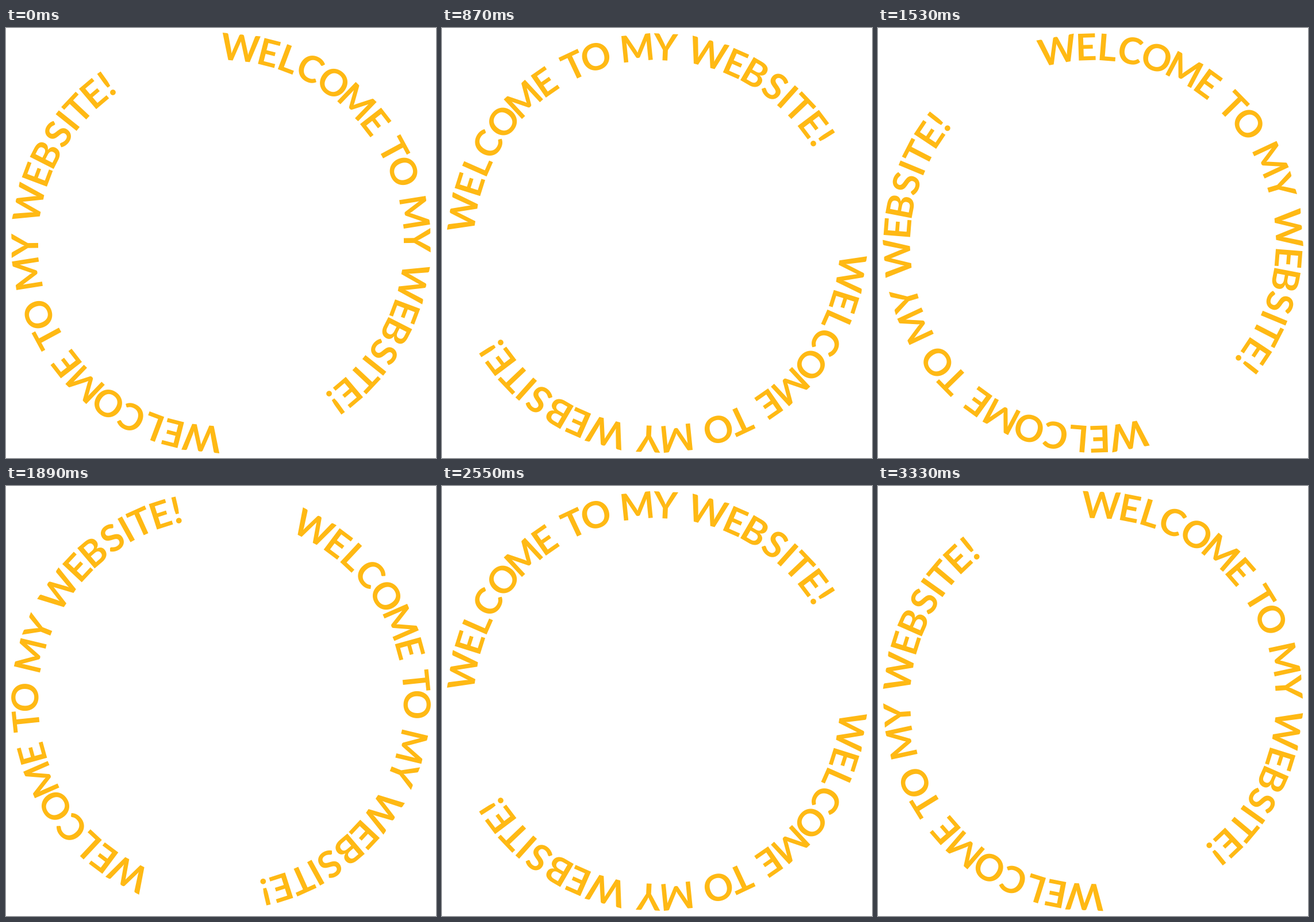
Recreate the animation shown at these times as an HTML page with a canvas. Size 748 by 748 pixels, loop 3.36 s.

```html
<!DOCTYPE html>
<html lang="en">
<head>
<meta charset="utf-8">
<title>Welcome ring</title>
<style>
  html, body { margin: 0; width: 100%; height: 100%; overflow: hidden; background: #fff; }
  canvas { display: block; }
</style>
</head>
<body>
<canvas id="stage" width="748" height="748" role="img" aria-label="Welcome to my website!"></canvas>
<script>
const CENTER = 374;
const BASELINE_RADIUS = 318;
const LOOP = 3360;
const STEP = 30;
const DEGREE = Math.PI / 180;

// Clockwise angle of each letter's middle, in degrees from the top.
const words = [
  ["WELCOME", [5.6, 14.3, 20.6, 27.2, 35.1, 43.9, 52.1]],
  ["TO", [61.6, 68.6]],
  ["MY", [81, 89.3]],
  ["WEBSITE!", [101.7, 110.6, 117, 123.7, 128.6, 133.25, 139.7, 144.35]]
];

const ctx = document.getElementById("stage").getContext("2d");
ctx.font = "700 64.2px Lato, sans-serif";
ctx.fillStyle = "#ffb914";

const letters = words.flatMap(([word, angles]) => [...word].map((char, i) => {
  const box = ctx.measureText(char);
  const middle = (box.actualBoundingBoxRight - box.actualBoundingBoxLeft) / 2;
  return { char, middle, angle: angles[i] };
}));

function drawSentence(rotation) {
  for (const { char, middle, angle } of letters) {
    ctx.save();
    ctx.translate(CENTER, CENTER);
    ctx.rotate((rotation + angle) * DEGREE);
    ctx.fillText(char, -middle, -BASELINE_RADIUS);
    ctx.restore();
  }
}

function draw(now) {
  const time = Math.floor(now / STEP + 0.02) * STEP;
  const rotation = (time % LOOP) / LOOP * 360;
  ctx.clearRect(0, 0, 748, 748);
  drawSentence(rotation);
  drawSentence(rotation + 180);
  requestAnimationFrame(draw);
}
requestAnimationFrame(draw);
</script>
</body>
</html>
```
